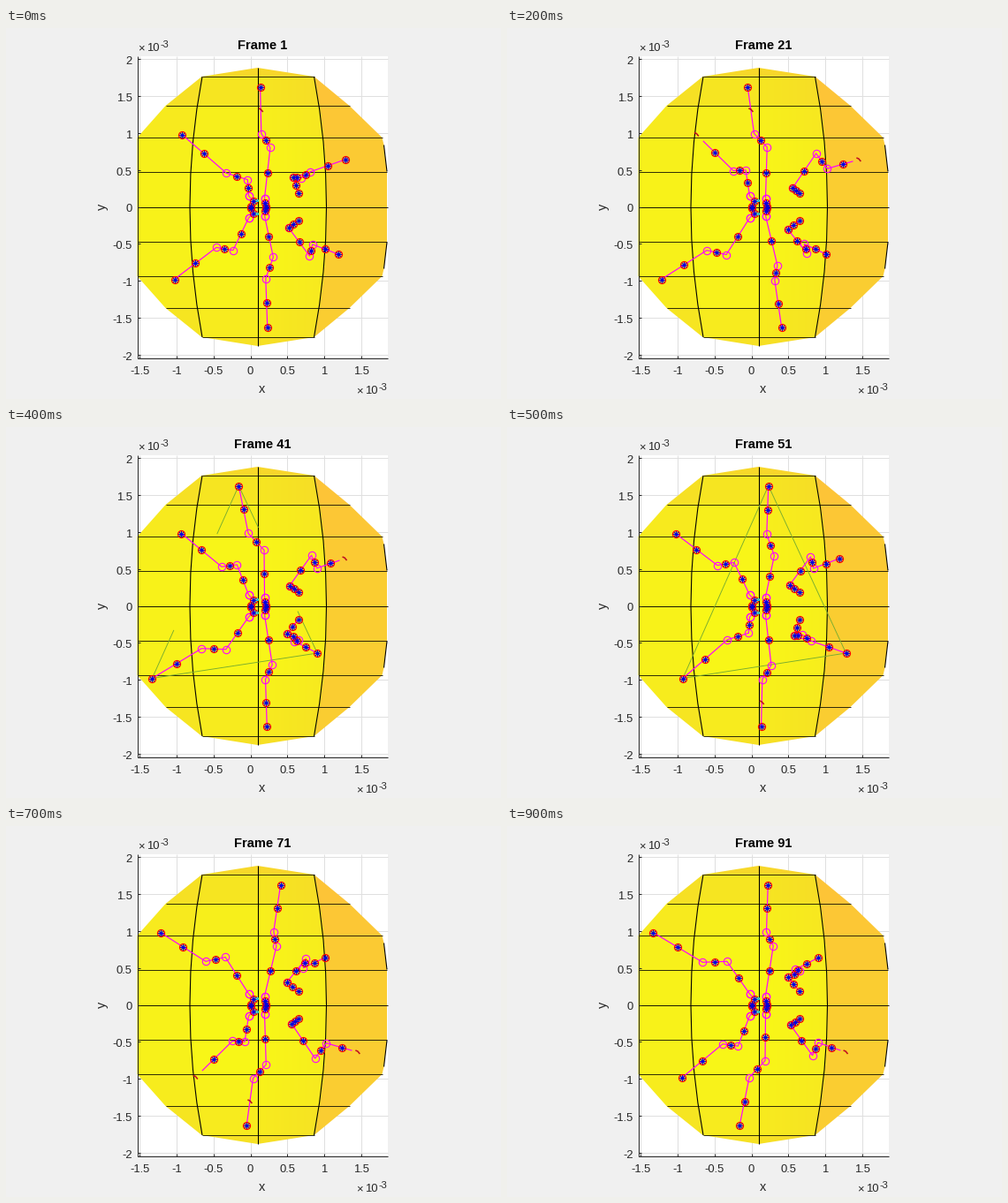
Animation of 560 by 420 pixels, one loop 1000 ms. Source, as a matplotlib script:

```python
import math

import numpy as np
import matplotlib.pyplot as plt
from matplotlib.animation import ArtistAnimation
from matplotlib.patches import Polygon, Rectangle

W, H, DPI = 560, 420, 100
PX = 72 / DPI
STEPS = 10
MID_Y = 203
LEFT, RIGHT, TOP, BOTTOM = 149, 432, 32, 374
UNIT = 83.6
INK = "#262626"
ROWS = [39.5, 78.5, 114.5, 147.5]

plt.rcParams["font.family"] = "Liberation Sans"
fig = plt.figure(figsize=(W / DPI, H / DPI), dpi=DPI, facecolor="#f0f0f0")
ax = fig.add_axes([0, 0, 1, 1])
ax.set_xlim(0.5, W + 0.5)
ax.set_ylim(H + 0.5, 0.5)
ax.axis("off")


def line(xs, ys, color, width=1.0, z=1):
    return ax.plot(xs, ys, color=color, lw=width * PX, zorder=z,
                   solid_capstyle="butt")[0]


def text(x, y, s, size=13, **kw):
    kw = {"ha": "center", "va": "center", "color": INK, **kw}
    return ax.text(x, y + 1, s, fontsize=size * PX, zorder=9, **kw)


def flip(pts):
    pts = np.array(pts, float)
    pts[:, 1] = 2 * MID_Y - pts[:, 1]
    return pts


def draw_axes():
    ax.add_patch(Rectangle((LEFT, TOP), RIGHT - LEFT, BOTTOM - TOP,
                           fc="white", ec="none", zorder=0))
    for k in range(-3, 4):
        x = 277 + k * UNIT / 2
        line([x, x], [TOP, BOTTOM], "#dfdfdf")
        line([x, x], [BOTTOM, BOTTOM - 3], INK, z=7)
        text(x, 388.5, f"{k / 2:g}")
    for k in range(-4, 5):
        y = MID_Y - k * UNIT / 2
        line([LEFT, RIGHT], [y, y], "#dfdfdf")
        line([LEFT, LEFT + 3], [y, y], INK, z=7)
        text(143, y + 0.5, f"{k / 2:g}", ha="right", va="center_baseline")
    line([LEFT, LEFT, RIGHT], [TOP, BOTTOM, BOTTOM], INK, z=7)
    text(290, 408.5, "x", 14.5)
    text(109, 202, "y", 14.5, rotation=90)
    for x, y in ((150, 23), (397, 411)):
        text(x, y, "×", 13, ha="left")
        text(x + 9.5, y, "10", 13, ha="left")
        text(x + 25, y - 4, "-3", 11, ha="left")


def seam(x0, bend, y):
    return x0 + bend * ((y - MID_Y) / ROWS[-1]) ** 2


def draw_surface():
    ys, xs = np.mgrid[0:H, 0:W].astype(float)
    row = np.searchsorted(ROWS, np.abs(ys - MID_Y))
    tilt = np.where(ys < MID_Y, 1.4, 1)
    level = 0.05 + 0.022 * tilt * row ** 2
    level += 0.14 * np.clip((xs - 285) / 78, 0, 1)
    level += 0.08 * (xs < seam(208.5, 14, ys))
    outer = xs > seam(363, -14, ys)
    level[outer] = (0.74 + 0.05 * row * (tilt - 1) / 0.4)[outer]
    rgb = np.dstack([np.interp(level, [0, 0.45, 1], c) for c in
                     ((249, 246, 255), (251, 222, 190), (21, 38, 60))]) / 255
    half = [(149, 124.5), (181, 88.5), (222, 55.5), (285, 45.5), (349, 55.5),
            (389, 88.5), (426, 124.5), (428, 133), (431.5, 163.5)]
    shape = Polygon(half + list(flip(half[::-1])), fc="none", ec="none")
    ax.add_patch(shape)
    image = ax.imshow(rgb, extent=(0, W, H, 0), aspect="auto", zorder=2)
    image.set_clip_path(shape)

    for dy, x0, x1 in zip(ROWS, (149, 149, 181, 222), (431, 426, 389, 349)):
        for y in (MID_Y - dy, MID_Y + dy):
            line([x0, x1], [y, y], "black", 0.8, 3)
    line([LEFT, RIGHT], [MID_Y, MID_Y], "black", 0.9, 3)
    y = MID_Y + np.linspace(-ROWS[-1], ROWS[-1], 9)
    line([285, 285], [45.5, 360.5], "black", 1.1, 3)
    for x0, bend in ((208.5, 14), (363, -14)):
        line(seam(x0, bend, y), y, "black", 1.1, 3)
    rim = [(428, 133), (431.5, 163)]
    for ends in (rim, flip(rim)):
        line(*np.transpose(ends), "black", 1.1, 3)


# Each joint, from the tip inward: home, shift by stride, shift by lift.
# "sunk" is the span of the stride in which "part" dips below the surface.
STILL = (0, 0)
FRONT = dict(joints=[((193, 121), (29, 0), STILL),
                     ((240, 157.5), (22, 6), (5, 6)),
                     ((258.5, 154.5), (16, 9), (12, 16)),
                     ((275, 190.5), STILL, STILL)],
             part="tip", sunk=(1.8, 3.5))
MIDDLE = dict(joints=[((290, 67), (28, 0), STILL),
                      ((290.5, 120), (17, 0), (0, 2)),
                      ((300, 136), (8.5, 1), (1, 10)),
                      ((293, 193), STILL, STILL)],
              part="shin", sunk=(4.7, 8.5))
REAR = dict(joints=[((378, 149.5), (27, 0), STILL),
                    ((348.5, 160.5), (19, -1), (-8, 3)),
                    ((344.5, 147), (7.5, -6), (-12, 25)),
                    ((320.5, 179.5), (4, 3), (4, -11)),
                    ((331, 187.5), STILL, STILL)],
            part="tip", sunk=(1.8, 4.5))
SWING_START, SWING_STEPS = 8.6, 2.5


def gait(phase):
    """Return stride (-1 back to 1 forward) and lift (0 to 1)."""
    t = (phase - SWING_START) % STEPS / SWING_STEPS
    if t < 1:
        ease = t ** 3 * (10 - 15 * t + 6 * t * t)
        return 2 * ease - 1, math.sin(math.pi * t)
    return max(-1, 1 - 2 * (phase - 1.1) / 7.3), 0


def pose(leg, phase, mirrored):
    stride, lift = gait(phase)
    pts = np.array([np.array(home) + stride * np.array(u) + lift * np.array(v)
                    for home, u, v in leg["joints"]])
    return flip(pts) if mirrored else pts


def markers(pts, kind, color, size, z, width=1.0):
    x, y = np.transpose(pts)
    return ax.plot(x, y, ls="none", marker=kind, ms=size * PX, mfc="none",
                   mec=color, mew=width * PX, zorder=z)[0]


def scrap(p):
    x, y = p
    return line([x - 2.5, x, x + 2.5], [y - 2, y - 1, y + 2], "#c01020", 1.6, 6)


def triangle(left, top, right, lift):
    art = []
    for a, b, share in ((top, left, 0.52 * lift), (top, right, 0.52 * lift),
                        (left, right, 1.5 * lift)):
        for p, q in ((a, b), (b, a)):
            end = p + min(share, 0.5) * (q - p)
            art.append(line([p[0], end[0]], [p[1], end[1]], "#77ac30", 0.9, 4))
    return art


def draw_frame(step):
    art = [text(291, 19.5, f"Frame {10 * step + 1}", 14.6,
                weight="bold", color="black")]
    rings, stars, tripod = [], [], []
    for leg in (FRONT, MIDDLE, REAR):
        for mirrored in (False, True):
            second = mirrored != (leg is MIDDLE)
            phase = (step + 5 * second) % STEPS
            pts = pose(leg, phase, mirrored)
            mids = list((pts[:-1] + pts[1:]) / 2)
            tip = pts[0].copy()
            if second:
                tripod.append(tip)
            sunk = leg["sunk"][0] < phase < leg["sunk"][1]
            if sunk and leg["part"] == "tip":
                art.append(scrap(tip))
                pts[0] = pts[1] + 0.82 * (tip - pts[1])
            else:
                stars.append(tip)
            if sunk and leg["part"] == "shin":
                art.append(scrap(mids.pop(0)))
            stars.extend(mids)
            rings.extend(pts[1:4])
            if leg is REAR:
                stars.extend(pts[3:])
            art.append(line(*pts.T, "magenta", 1.2, 5))

    hips = [(275, 190.5), (280, 196), (277.5, 202)]
    waist = [(293, 193), (293.5, 198.5), (294.5, 202)]
    for chain in (hips, waist, flip(hips), flip(waist)):
        art.append(line(*np.transpose(chain), "magenta", 1.2, 5))
        rings.append(chain[0])
        stars.extend(chain[1:])

    art += triangle(*tripod, gait((step + 5) % STEPS)[1])
    art += [markers(rings, "o", "magenta", 8.4, 5.5, 1.1),
            markers(stars, "o", "red", 8, 6, 1.2),
            markers(stars, (8, 2, 0), "#0000e0", 7, 6.5, 0.75),
            markers([(284, 195), (284, 210)], "o", "cyan", 2, 6.6)]
    return art


draw_axes()
draw_surface()
anim = ArtistAnimation(fig, [draw_frame(i) for i in range(STEPS)],
                       interval=100, repeat=True, repeat_delay=0)
plt.show()
```
